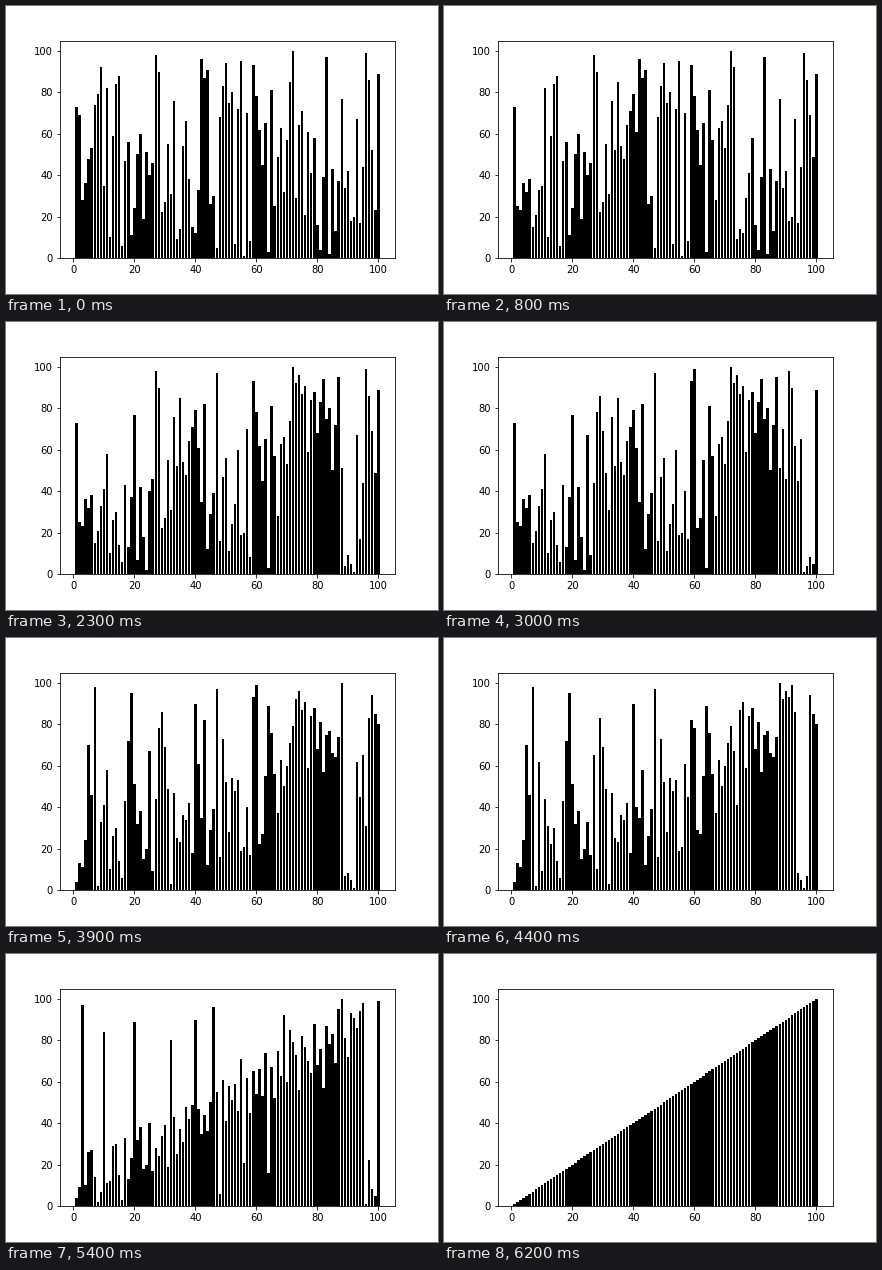
Recreate the animation shown at these times as a matplotlib script. Size 432 by 288 pixels, loop 6300 ms.

```python
import matplotlib.pyplot as plt
from matplotlib.animation import FuncAnimation

START = [
    73, 69, 28, 36, 48, 53, 74, 79, 92, 35, 82, 10, 59, 84, 88, 6, 47, 56, 11, 24,
    50, 60, 19, 51, 40, 46, 98, 90, 22, 27, 55, 31, 76, 9, 14, 54, 66, 38, 15, 12,
    33, 96, 87, 91, 26, 30, 5, 68, 83, 94, 75, 80, 7, 72, 95, 1, 70, 8, 93, 78,
    62, 45, 65, 3, 81, 25, 49, 63, 32, 57, 85, 100, 29, 64, 71, 21, 61, 41, 58, 16,
    4, 39, 97, 2, 43, 13, 37, 77, 34, 42, 18, 20, 67, 17, 44, 99, 86, 52, 23, 89,
]
GAPS = [32, 16, 8, 4, 2, 1]


def gap_insertion(a, first, gap):
    """Insertion sort on every gap-th item; negative indices wrap to the end."""
    for i in range(first + gap, len(a), gap):
        value, pos = a[i], i
        while pos > 0 and a[pos - gap] > value:
            a[pos] = a[pos - gap]
            pos -= gap
        a[pos] = value


def shell_sort(values):
    """Yield the list after each pass over one sublist."""
    a = list(values)
    for gap in GAPS:
        for first in range(gap):
            gap_insertion(a, first, gap)
            yield list(a)


states = list(shell_sort(START))

plt.rcParams["font.family"] = "DejaVu Sans"
fig, ax = plt.subplots(figsize=(6, 4), dpi=72, facecolor="white")
fig.subplots_adjust(left=0.125, right=0.9, bottom=0.125, top=0.88)
bars = ax.bar(range(1, len(START) + 1), START, color="black")


def draw(step):
    for bar, height in zip(bars, states[step]):
        bar.set_height(height)
    return bars


anim = FuncAnimation(fig, draw, frames=len(states), interval=100, repeat=True)
plt.show()
```
